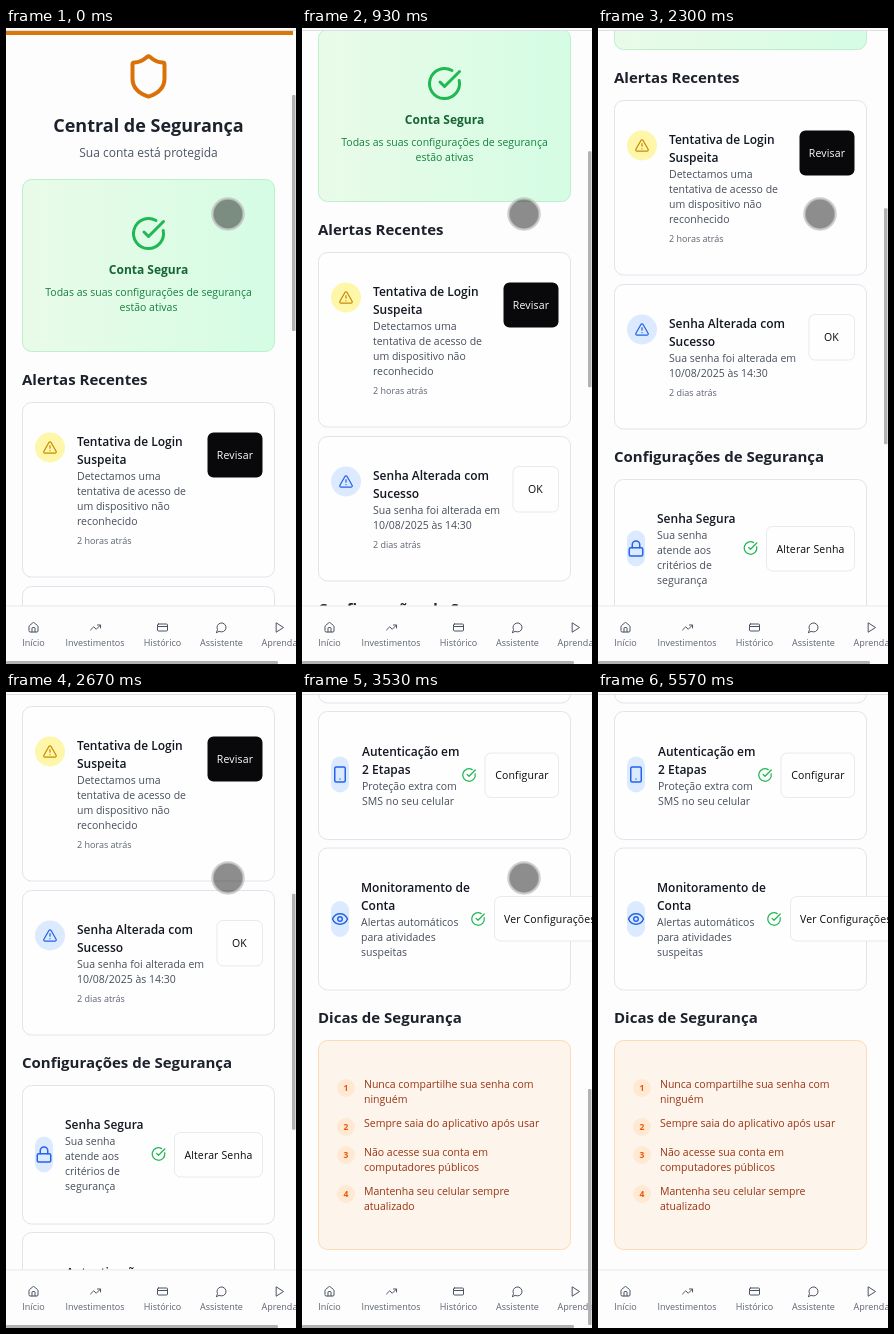
An HTML page for the animation above (5.61 s loop, 290 px wide and 636 px high).

```html
<!DOCTYPE html>
<html lang="pt-BR">
<head>
<meta charset="utf-8">
<title>Central de Segurança</title>
<style>
@property --scroll { syntax: '<integer>'; inherits: true; initial-value: 0; }

html, body { margin: 0; width: 100%; height: 100%; overflow: hidden; background: #fdfdfe; }
svg.stage {
  display: block; width: 100vw; height: 100vh;
  font: 10.5px 'Open Sans', 'Noto Sans', sans-serif;
  animation: scroll 5610ms infinite linear;
}
.page { transform: translateY(calc(var(--scroll) * -1px)); }
.thumb { transform: translateY(calc(var(--scroll) * .3746px)); }
.bars { fill: #b2b2b4; animation: fade 5610ms infinite linear; }
.touch { animation: lift 5610ms infinite step-end; }

/* wheel notches, then one long run to the end of the page */
@keyframes scroll {
  0%, 5.35% { --scroll: 0; animation-timing-function: ease-in-out; }
  8.02%, 12.48% { --scroll: 75; animation-timing-function: ease-in-out; }
  15.15%, 24.06% { --scroll: 150; animation-timing-function: ease-in-out; }
  26.74%, 35.65% { --scroll: 226; animation-timing-function: ease-in-out; }
  38.32%, 45.3% { --scroll: 302; animation-timing-function: cubic-bezier(.3, .1, .7, .8); }
  54.72% { --scroll: 631; animation-timing-function: cubic-bezier(.3, .4, .6, 1); }
  61.5%, 100% { --scroll: 881; }
}
@keyframes fade { 0%, 74% { opacity: 1; } 78%, 100% { opacity: 0; } }
@keyframes lift { 0% { visibility: visible; } 76%, 100% { visibility: hidden; } }

.mid { text-anchor: middle; }
.h1 { font-size: 18px; font-weight: 700; fill: #1c212b; }
.h2 { font-size: 15px; font-weight: 700; fill: #1c212b; }
.sub { font-size: 12px; fill: #4b5563; }
.name { font-size: 12px; font-weight: 600; fill: #111620; }
.body { fill: #464e5b; }
.small { font-size: 9px; fill: #5c6370; }
.label { font-weight: 500; letter-spacing: .15px; fill: #08080a; }
.tip { fill: #9a3412; }
.num { font-size: 8.5px; font-weight: 700; fill: #ea580c; }
.ok { fill: #15803d; }
.card { fill: #fefefe; stroke: #e3e3ec; }
.btn { fill: #fefefe; stroke: #e9e9ee; }
.icon { fill: none; stroke-width: 2; stroke-linecap: round; stroke-linejoin: round; }
.orange { stroke: #d97008; }
.amber { stroke: #ca8a04; }
.blue { stroke: #2563eb; }
.green { stroke: #20b853; }
.grey { stroke: #4b5260; }
.cool { fill: #dbeafe; }
</style>
</head>
<body>
<svg class="stage" viewBox="0 0 290 636">
  <defs>
    <linearGradient id="safe">
      <stop offset="0" stop-color="#e9fbe8"/>
      <stop offset="1" stop-color="#d5fce4"/>
    </linearGradient>
    <symbol id="shield" viewBox="0 0 24 24"><path d="M20 13c0 5-3.5 7.5-7.66 8.95a1 1 0 0 1-.67-.01C7.5 20.5 4 18 4 13V6a1 1 0 0 1 1-1c2 0 4.5-1.2 6.24-2.72a1.17 1.17 0 0 1 1.52 0C14.51 3.81 17 5 19 5a1 1 0 0 1 1 1z"/></symbol>
    <symbol id="check" viewBox="0 0 24 24"><path d="M21.8 10A10 10 0 1 1 17 3.34M9 11l3 3L22 4"/></symbol>
    <symbol id="alert" viewBox="0 0 24 24"><path d="M21.73 18l-8-14a2 2 0 0 0-3.48 0l-8 14A2 2 0 0 0 4 21h16a2 2 0 0 0 1.73-3M12 9v4M12 17h.01"/></symbol>
    <symbol id="lock" viewBox="0 0 24 24"><rect x="3" y="11" width="18" height="11" rx="2"/><path d="M7 11V7a5 5 0 0 1 10 0v4"/></symbol>
    <symbol id="phone" viewBox="0 0 24 24"><rect x="5" y="2" width="14" height="20" rx="2"/><path d="M12 18h.01"/></symbol>
    <symbol id="eye" viewBox="0 0 24 24"><path d="M2 12c4-9.3 16-9.3 20 0c-4 9.3-16 9.3-20 0z"/><circle cx="12" cy="12" r="3"/></symbol>
    <symbol id="home" viewBox="0 0 24 24"><path d="M15 21v-8a1 1 0 0 0-1-1h-4a1 1 0 0 0-1 1v8M3 10a2 2 0 0 1 .7-1.5l7-6a2 2 0 0 1 2.6 0l7 6A2 2 0 0 1 21 10v9a2 2 0 0 1-2 2H5a2 2 0 0 1-2-2z"/></symbol>
    <symbol id="trend" viewBox="0 0 24 24"><path d="M16 7h6v6M22 7l-8.5 8.5-5-5L2 17"/></symbol>
    <symbol id="bank" viewBox="0 0 24 24"><rect x="2" y="5" width="20" height="14" rx="2"/><path d="M2 10h20"/></symbol>
    <symbol id="chat" viewBox="0 0 24 24"><path d="M7.9 20A9 9 0 1 0 4 16.1L2 22z"/></symbol>
    <symbol id="play" viewBox="0 0 24 24"><path d="M6 3l14 9-14 9z"/></symbol>
  </defs>

  <rect width="290" height="636" fill="#fdfdfe"/>

  <g class="page">
    <rect y="3" width="287" height="4" fill="#d97708"/>
    <use href="#shield" class="icon orange" x="118.5" y="24.5" width="48" height="48"/>
    <text class="h1 mid" x="142.5" y="104">Central de Segurança</text>
    <text class="sub mid" x="142.5" y="129">Sua conta está protegida</text>

    <rect x="16.5" y="151.5" width="252" height="172" rx="9" fill="url(#safe)" stroke="#bbf0cb"/>
    <use href="#check" class="icon green" x="124.5" y="187.5" width="36" height="36"/>
    <g class="ok mid">
      <text x="142.5" y="246" font-size="12" font-weight="700" fill="#166534">Conta Segura</text>
      <text x="142.5" y="268">Todas as suas configurações de segurança</text>
      <text x="142.5" y="283">estão ativas</text>
    </g>

    <text class="h2" x="16" y="356.5">Alertas Recentes</text>

    <rect class="card" x="16.5" y="374.5" width="252" height="174.5" rx="9"/>
    <circle cx="44" cy="419.5" r="15" fill="#fef6a8"/>
    <use href="#alert" class="icon amber" x="36.5" y="412" width="15" height="15"/>
    <g class="name">
      <text x="71" y="418">Tentativa de Login</text>
      <text x="71" y="436">Suspeita</text>
    </g>
    <g class="body">
      <text x="71" y="452">Detectamos uma</text>
      <text x="71" y="467">tentativa de acesso de</text>
      <text x="71" y="482">um dispositivo não</text>
      <text x="71" y="497">reconhecido</text>
    </g>
    <text class="small" x="71" y="516">2 horas atrás</text>
    <rect x="201.5" y="404.5" width="55" height="45" rx="6" fill="#09090b"/>
    <text class="label mid" x="229" y="431" style="fill: #fff">Revisar</text>

    <rect class="card" x="16.5" y="558.5" width="252" height="144.5" rx="9"/>
    <circle class="cool" cx="44" cy="603.5" r="15"/>
    <use href="#alert" class="icon blue" x="36.5" y="596" width="15" height="15"/>
    <g class="name">
      <text x="71" y="602">Senha Alterada com</text>
      <text x="71" y="620">Sucesso</text>
    </g>
    <g class="body">
      <text x="71" y="636">Sua senha foi alterada em</text>
      <text x="71" y="651">10/08/2025 às 14:30</text>
    </g>
    <text class="small" x="71" y="670">2 dias atrás</text>
    <rect class="btn" x="211" y="588.5" width="45.5" height="45.5" rx="6"/>
    <text class="label mid" x="233.5" y="615">OK</text>

    <text class="h2" x="16" y="736">Configurações de Segurança</text>

    <rect class="card" x="16.5" y="753.5" width="252" height="138.5" rx="9"/>
    <rect class="cool" x="29" y="804.5" width="18" height="36" rx="9"/>
    <use href="#lock" class="icon blue" x="29" y="813.5" width="18" height="18"/>
    <text class="name" x="59" y="797">Senha Segura</text>
    <g class="body">
      <text x="59" y="813">Sua senha</text>
      <text x="59" y="828">atende aos</text>
      <text x="59" y="843">critérios de</text>
      <text x="59" y="858">segurança</text>
    </g>
    <use href="#check" class="icon green" x="145" y="814.5" width="15" height="15"/>
    <rect class="btn" x="168.5" y="800.5" width="88" height="44.5" rx="6"/>
    <text class="label mid" x="212.5" y="826.5">Alterar Senha</text>

    <rect class="card" x="16.5" y="900.5" width="252" height="128" rx="9"/>
    <rect class="cool" x="29" y="945.5" width="18" height="36" rx="9"/>
    <use href="#phone" class="icon blue" x="29" y="954.5" width="18" height="18"/>
    <g class="name">
      <text x="60" y="945">Autenticação em</text>
      <text x="60" y="963">2 Etapas</text>
    </g>
    <g class="body">
      <text x="60" y="979">Proteção extra com</text>
      <text x="60" y="994">SMS no seu celular</text>
    </g>
    <use href="#check" class="icon green" x="159.5" y="956.5" width="15" height="15"/>
    <rect class="btn" x="183" y="942" width="73.5" height="44.5" rx="6"/>
    <text class="label mid" x="220" y="968">Configurar</text>

    <rect class="card" x="16.5" y="1037" width="252" height="142" rx="9"/>
    <rect class="cool" x="29" y="1090" width="18" height="36" rx="9"/>
    <use href="#eye" class="icon blue" x="29" y="1099" width="18" height="18"/>
    <g class="name">
      <text x="59" y="1081">Monitoramento de</text>
      <text x="59" y="1099">Conta</text>
    </g>
    <g class="body">
      <text x="59" y="1115">Alertas automáticos</text>
      <text x="59" y="1130">para atividades</text>
      <text x="59" y="1145">suspeitas</text>
    </g>
    <use href="#check" class="icon green" x="168.5" y="1100.5" width="15" height="15"/>
    <rect class="btn" x="192.5" y="1085.5" width="108" height="44.5" rx="6"/>
    <text class="label" x="202" y="1111.5">Ver Configurações</text>

    <text class="h2" x="16" y="1212">Dicas de Segurança</text>

    <rect x="16.5" y="1229.5" width="252" height="209" rx="9" fill="#fdf4ec" stroke="#fbdcb4"/>
    <g fill="#ffe9d2">
      <circle cx="44" cy="1277" r="9"/>
      <circle cx="44" cy="1316" r="9"/>
      <circle cx="44" cy="1344" r="9"/>
      <circle cx="44" cy="1383" r="9"/>
    </g>
    <g class="num mid">
      <text x="44" y="1280">1</text>
      <text x="44" y="1319">2</text>
      <text x="44" y="1347">3</text>
      <text x="44" y="1386">4</text>
    </g>
    <g class="tip">
      <text x="62" y="1277">Nunca compartilhe sua senha com</text>
      <text x="62" y="1292">ninguém</text>
      <text x="62" y="1316">Sempre saia do aplicativo após usar</text>
      <text x="62" y="1345">Não acesse sua conta em</text>
      <text x="62" y="1360">computadores públicos</text>
      <text x="62" y="1384">Mantenha seu celular sempre</text>
      <text x="62" y="1399">atualizado</text>
    </g>
  </g>

  <rect width="290" height="2" fill="#fdfdfe"/>
  <rect y="2" width="290" height="1" fill="#dedee4"/>

  <rect y="578" width="290" height="55" fill="#fdfdfe"/>
  <rect y="577.5" width="290" height="1" fill="#e9e9f0"/>
  <g class="icon grey">
    <use href="#home" x="21.5" y="593.5" width="12" height="12"/>
    <use href="#trend" x="83.5" y="593.5" width="12" height="12"/>
    <use href="#bank" x="150.5" y="593.5" width="12" height="12"/>
    <use href="#chat" x="209.5" y="593.5" width="12" height="12"/>
    <use href="#play" x="267.5" y="593.5" width="12" height="12"/>
  </g>
  <g class="small mid">
    <text x="27.5" y="618">Início</text>
    <text x="89" y="618">Investimentos</text>
    <text x="156.5" y="618">Histórico</text>
    <text x="215.5" y="618">Assistente</text>
    <text x="273.5" y="618">Aprenda</text>
  </g>

  <g class="bars">
    <rect class="thumb" x="286" y="67" width="3.5" height="236" rx="1"/>
    <rect y="633" width="272" height="3" rx="1"/>
  </g>

  <g class="touch">
    <circle cx="222" cy="186" r="15" fill="#303030" fill-opacity=".55"/>
    <circle cx="222" cy="186" r="15.5" fill="none" stroke="#b9b9b9" stroke-opacity=".7" stroke-width="2.5"/>
  </g>
</svg>
</body>
</html>
```
